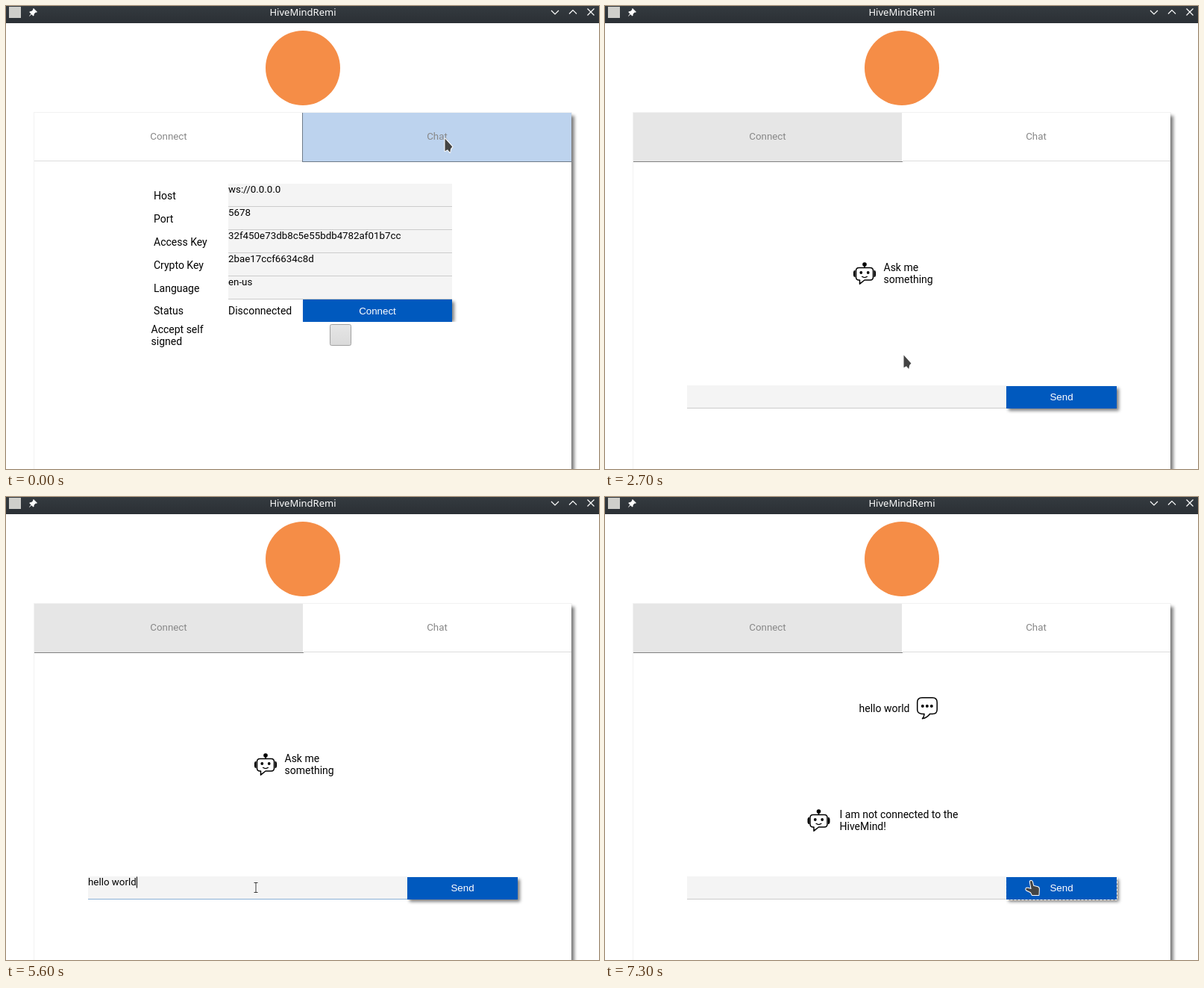
An HTML page for the animation above (8000 ms loop, 795 px wide and 620 px high).

```html
<!DOCTYPE html>
<html lang="en">
<head>
<meta charset="utf-8">
<title>HiveMindRemi</title>
<style>
  html, body { margin: 0; width: 100%; height: 100%; overflow: hidden; background: #fff; }
  svg { display: block; width: 795px; height: 620px; }
  text { font: 14px Roboto, sans-serif; white-space: pre; }
  .small { font-size: 13.333px; }
  .tab { font-size: 13.333px; fill: #888; text-anchor: middle; }
  .btn { font: 13.333px "Liberation Sans", Arial, sans-serif; fill: #fff; text-anchor: middle; }
  .title { font: 13px "Noto Sans", sans-serif; fill: #fcfcfc; text-anchor: middle; }
  .line { fill: none; stroke: #000; stroke-linecap: round; stroke-linejoin: round; }
  .win { fill: none; stroke: #fcfcfc; stroke-width: 1.2; }
  .pointer { fill: #444; stroke: #fff; stroke-width: 2; stroke-linejoin: round; paint-order: stroke; }
</style>
</head>
<body>
<svg viewBox="0 0 795 620" xmlns="http://www.w3.org/2000/svg">
  <defs>
    <filter id="soft" x="-20%" y="-60%" width="140%" height="220%"><feGaussianBlur stdDeviation="2"/></filter>
    <filter id="wide" filterUnits="userSpaceOnUse" x="20" y="120" width="775" height="560"><feGaussianBlur stdDeviation="2"/></filter>
    <linearGradient id="bar" x1="0" y1="0" x2="0" y2="1">
      <stop offset="0" stop-color="#343a3f"/><stop offset="1" stop-color="#2b3035"/>
    </linearGradient>
    <linearGradient id="box" x1="0" y1="0" x2="0" y2="1">
      <stop offset="0" stop-color="#e6e6e6"/><stop offset="1" stop-color="#dadada"/>
    </linearGradient>
    <g id="robot">
      <path class="line" stroke-width="1.5" d="M-7.500-7.500H7.500Q11.500-7.500 11.500-3.500V5Q11.500 9 7.500 9H0L-6.500 14.200V9H-7.500Q-11.500 9-11.500 5V-3.500Q-11.500-7.500-7.500-7.500zM0-8V-11"/>
      <circle cy="-12" r="2.800"/>
      <path d="M-12.500-4.200q-2.500.2-2.500 2.700v4q0 2.500 2.500 2.700zM12.500-4.200q2.500.2 2.500 2.700v4q0 2.500-2.500 2.700z"/>
      <circle cx="-4.700" cy="-1" r="1.900"/><circle cx="4.700" cy="-1" r="1.900"/>
      <path class="line" d="M-3.500 4.300Q0 6.800 3.500 4.300" stroke-width="1.200"/>
    </g>
  </defs>

  <rect width="795" height="620" fill="#fff"/>
  <rect width="795" height="23" fill="url(#bar)"/>
  <rect x="4" y="1" width="16" height="15" fill="#cfcfcb"/>
  <path d="M37 3l5 5-1.200.8-1-.3-2.200 2.300-.1 2-1 .6-2.200-2.200-3 2.600-.4-.4 2.600-3-2.200-2.200.7-1 2-.1 2.300-2.200-.3-1z" fill="#fcfcfc"/>
  <text class="title" x="398" y="13">HiveMindRemi</text>
  <path class="win" d="M731 6l5 5 5-5M755 10.500l5-5 5 5M779.500 3.500l9 9M788.500 3.500l-9 9"/>
  <circle cx="398" cy="83" r="50" fill="#f58d47"/>

  <rect x="37" y="142" width="722" height="500" fill="#f3f3f3"/>
  <rect x="42" y="147" width="720" height="520" fill="#000" opacity=".5" filter="url(#wide)"/>
  <rect x="38" y="143" width="720" height="500" fill="#fff"/>

  <g id="connectPage">
    <rect x="38" y="207" width="359" height="1" fill="#ddd"/>
    <rect x="397" y="143" width="361" height="66" fill="#6f7b8a"/>
    <rect x="398" y="143" width="360" height="65" fill="#bdd3ee"/>
    <g id="fields"></g>
    <text x="198" y="413">Status</text>
    <text x="298" y="413">Disconnected</text>
    <rect x="401" y="396" width="200" height="27" opacity=".5" filter="url(#soft)"/>
    <rect x="398" y="423" width="210" height="10" fill="#fff"/>
    <rect x="398" y="393" width="200" height="30" fill="#0059be"/>
    <text class="btn" x="498" y="413">Connect</text>
    <text x="194.500" y="438">Accept self</text>
    <text x="194.500" y="454">signed</text>
    <rect x="434.500" y="426.500" width="28" height="28" rx="2" fill="url(#box)" stroke="#a0a0a0"/>
  </g>

  <g id="chatPage">
    <rect x="38" y="143" width="360" height="65" fill="#e6e6e6"/>
    <rect x="38" y="208" width="361" height="1" fill="#808080"/>
    <rect x="399" y="207" width="359" height="1" fill="#ddd"/>
    <g id="greeting">
      <use href="#robot" x="348" y="358"/>
      <text x="373.500" y="355">Ask me</text>
      <text x="373.500" y="371">something</text>
    </g>
    <g id="reply">
      <text x="340.500" y="288">hello world</text>
      <path class="line" stroke-width="1.5" d="M425 290.500Q418.700 290 418.700 284.500V275Q418.700 268.700 425 268.700H439Q445.200 268.700 445.200 275V284.500Q445.200 290.500 439 290.500H435.500Q432 295.500 425.500 296.800Q428 294 428 290.500z"/>
      <circle cx="425.800" cy="280" r="2"/><circle cx="431.800" cy="280" r="2"/><circle cx="437.800" cy="280" r="2"/>
      <use href="#robot" x="286.500" y="433"/>
      <text x="314.500" y="430">I am not connected to the</text>
      <text x="314.500" y="446">HiveMind!</text>
    </g>
    <rect x="110" y="508" width="428" height="30" fill="#f4f4f4"/>
    <rect id="underline" x="110" y="538" width="428" height="1"/>
    <text id="typed" class="small" x="110" y="520"></text>
    <rect id="caret" y="508.500" width="1" height="15"/>
    <rect id="shade" width="148" height="30" filter="url(#soft)"/>
    <rect id="send" x="538" y="509" width="148" height="30"/>
    <rect id="focus" x="537.500" y="508.500" width="149" height="31" fill="none" stroke-dasharray="3 2"/>
    <text class="btn" x="612" y="528">Send</text>
  </g>

  <text class="tab" x="218" y="179">Connect</text>
  <text class="tab" x="578" y="179">Chat</text>

  <path id="arrow" class="pointer" d="M.5.500V17.200L4 15.200 7.200 19 8.200 14 10.400 11.500z"/>
  <g id="beam" fill="none">
    <path d="M-2.500-6.500H2.500M0-6.500V6.500M-2.500 6.500H2.500" stroke="#fff" stroke-width="3"/>
    <path d="M-2.500-6.500H2.500M0-6.500V6.500M-2.500 6.500H2.500" stroke="#333"/>
  </g>
  <path id="hand" class="pointer" d="M6.800 2.800Q6.600 1.200 8 1T9.900 2.300L11.300 7.800 17 9.200Q19 9.800 18.900 12L18.500 20H9.800L7.800 16.300 2 13.600Q.8 12.600 1.500 11.300 2.300 10.300 3.800 10.700L8.600 12z"/>
</svg>
<script>
const $ = id => document.getElementById(id);
const show = (id, on) => $(id).setAttribute("display", on ? "inline" : "none");
const set = (id, attrs) => { for (const k in attrs) $(id).setAttribute(k, attrs[k]); };
const last = (list, t) => list.filter(row => row[0] <= t).pop();

const LOOP = 8000;
const DARK = "#00448f", BLUE = "#0059be";
const rows = [
  ["Host", "ws://0.0.0.0"],
  ["Port", "5678"],
  ["Access Key", "32f450e73db8c5e55bdb4782af01b7cc"],
  ["Crypto Key", "2bae17ccf6634c8d"],
  ["Language", "en-us"]
];
$("fields").innerHTML = rows.map(([label, value], i) => {
  const y = 238 + 31 * i;
  return `<rect x="298" y="${y}" width="300" height="30" fill="#f4f4f4"/>
    <rect x="298" y="${y + 30}" width="300" height="1" fill="#ccc"/>
    <text x="198" y="${y + 21}">${label}</text>
    <text class="small" x="298" y="${y + 12}">${value}</text>`;
}).join("");

const message = "hello world";
const keyTimes = [4000, 4100, 4400, 4600, 4800, 5000, 5100, 5200, 5300, 5400, 5600];

// time, pointer, x, y
const pointers = ["arrow", "beam", "hand"];
const moves = [
  [0, "arrow", 588, 177],
  [2700, "arrow", 400, 467],
  [2800, "arrow", 388, 487],
  [3200, "arrow", 376, 495],
  [3300, "arrow", 354, 509],
  [3400, "beam", 335, 523],
  [6000, "beam", 362, 520],
  [6100, "beam", 420, 512],
  [6200, "beam", 494, 511],
  [6300, "hand", 548, 510],
  [6400, "hand", 561, 512],
  [6500, "hand", 563, 513]
];

function draw(t) {
  const chat = t >= 1100;
  const focused = t >= 3600 && t < 6600;
  const pressed = t >= 6600 && t < 6800;
  const replied = t >= 6900;

  show("connectPage", !chat);
  show("chatPage", chat);
  show("greeting", !replied);
  show("reply", replied);

  const count = keyTimes.filter(k => k <= t).length;
  const text = replied ? "" : message.slice(0, count);
  $("typed").textContent = text;
  set("underline", { fill: focused ? "#8ab0d6" : "#ccc" });
  show("caret", focused);
  if (focused) {
    const width = text ? $("typed").getComputedTextLength() : 0;
    set("caret", { x: Math.round(110 + width) });
  }

  set("send", { fill: pressed ? DARK : BLUE });
  set("shade", pressed ? { x: 538, y: 510, opacity: .4 } : { x: 541, y: 512, opacity: .5 });
  show("focus", t >= 6600);
  set("focus", { stroke: t < 7300 ? DARK : "#fff" });

  const [, kind, x, y] = last(moves, t);
  for (const id of pointers) show(id, id === kind);
  set(kind, { transform: `translate(${x} ${y})` });
}

const start = performance.now();
function tick() {
  draw((performance.now() - start) % LOOP);
  requestAnimationFrame(tick);
}
tick();
</script>
</body>
</html>
```
